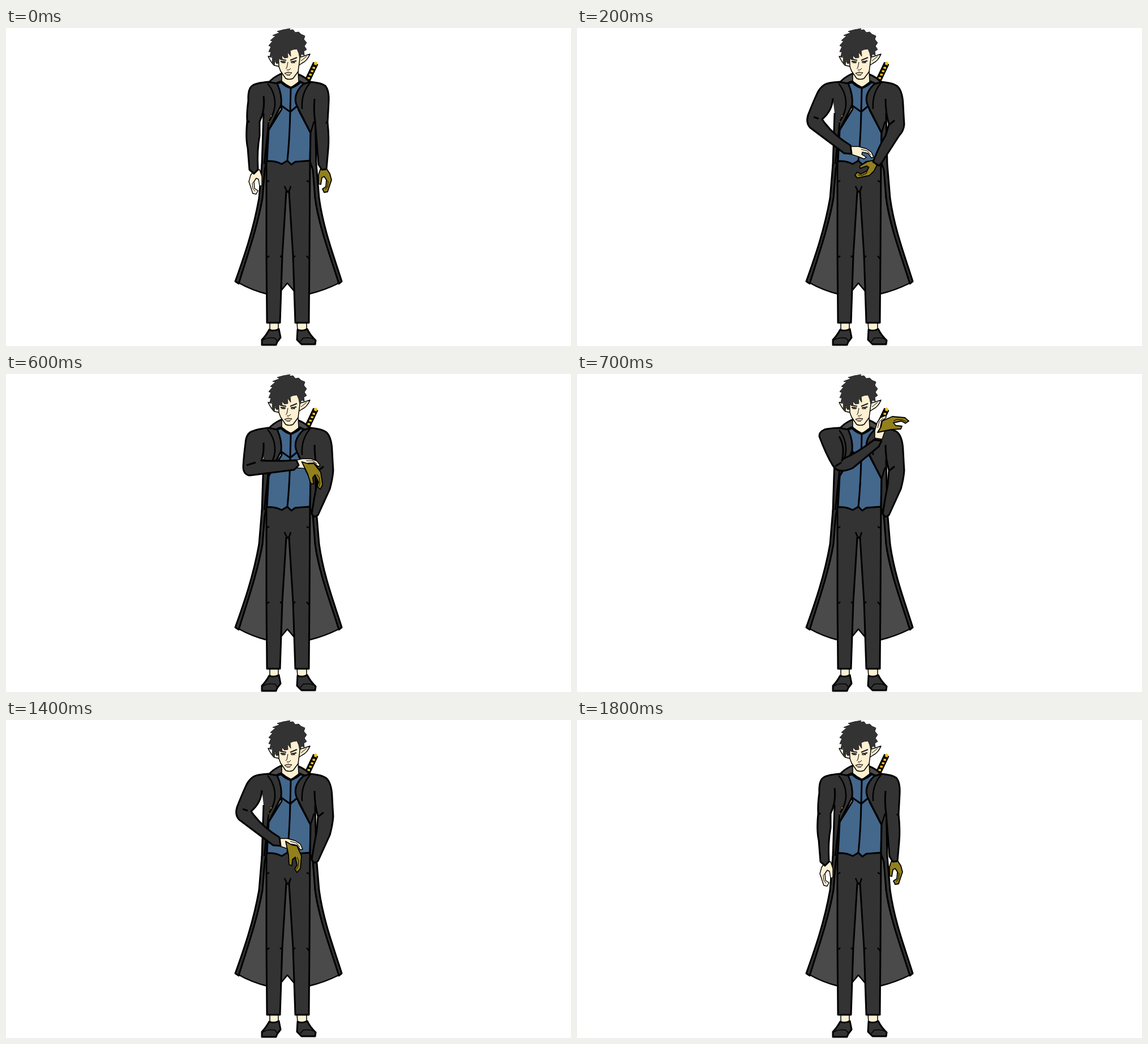
Animation, 998 px wide and 561 px high, one loop 1.9 s. Source, as an HTML page with a canvas:

```html
<!DOCTYPE html>
<html lang="en">
<head>
<meta charset="utf-8">
<title>Swordsman removing a glove</title>
<style>
html, body { margin: 0; width: 100%; height: 100%; overflow: hidden; background: #fff; }
canvas { display: block; }
</style>
</head>
<body>
<canvas id="stage" width="998" height="561"></canvas>
<script>
const ctx = document.getElementById('stage').getContext('2d');
const DARK = '#333', LINING = '#4a4a4a', BLUE = '#44678c', SKIN = '#fff0d2', GLOVE = '#92801c', GOLD = '#f2c318';

function shape(d, fill, width = 3, stroke = '#000') {
  const path = new Path2D(d);
  if (fill) { ctx.fillStyle = fill; ctx.fill(path); }
  if (width) { ctx.lineWidth = width; ctx.strokeStyle = stroke; ctx.stroke(path); }
}
const line = (d, width = 3, color) => shape(d, null, width, color);

function at([x, y, angle = 0], draw, flip = 1) {
  ctx.save();
  ctx.translate(x, y);
  ctx.rotate(angle * Math.PI / 180);
  ctx.scale(flip, 1);
  draw();
  ctx.restore();
}

// Blends two paths that share the same commands.
function mix(a, b, k = 0.5) {
  const number = /-?[\d.]+/g, ends = b.match(number);
  let i = 0;
  return a.replace(number, v => +v + (ends[i++] - v) * k);
}

const swordArm = {
  down: 'M463 95 Q442 97 436 101 Q427 106 428 128 Q425 150 426 165 Q423 195 427 212 L430 250 L438 257 L445 250 Q443 215 448 190 L448 165 Q458 145 455 120 M425 168 L430 164',
  waist: 'M463 95 Q444 96 437 100 Q428 106 423 118 Q414 138 408 154 Q404 168 412 176 L472 221 L485 222 L483 207 Q455 190 438 168 L433 161 Q451 146 452 124 M418 157 L427 160',
  chest: 'M463 95 Q444 97 435 101 Q424 105 423 122 Q420 145 419 163 Q419 177 430 179 L509 169 L517 161 L513 152 Q490 154 453 153 L451 153 Q456 140 455 121 M425 161 L441 156',
  shoulder: 'M463 95 Q444 96 437 98 Q427 103 428 110 Q440 142 451 160 Q460 178 487 166 L533 128 L538 118 L525 116 Q495 139 470 150 L468 153 Q474 128 463 110 M456 163 L467 156'
};
const gloveArm = {
  down: 'M538 95 Q558 97 564 102 Q571 110 570 130 Q569 150 568 166 Q571 195 569 215 L566 249 L558 250 L552 241 Q550 215 548 190 L546 165 Q543 145 545 125 M569 164 L565 168',
  waist: 'M538 95 Q558 97 565 102 Q575 110 576 135 Q577 155 578 170 Q577 182 569 190 L538 238 L533 243 L523 236 Q535 205 545 190 L551 170 Q545 150 545 125 M551 171 L561 163',
  bare: 'M538 95 Q558 97 565 102 Q575 110 576 135 Q577 155 578 170 Q577 185 572 203 L551 249 L545 252 L540 247 Q544 220 549 195 L551 170 Q545 150 545 125 M551 171 L561 163'
};

// relaxed: open hand; grip: reaching hand; worn: glove on; held: glove carried in the grip
const poses = [
  { left: swordArm.down, right: gloveArm.down, relaxed: [443, 251, 0], worn: [561, 248, 0] },
  { left: mix(swordArm.down, swordArm.waist), right: mix(gloveArm.down, gloveArm.waist), relaxed: [465, 233, -28], worn: [545, 243, 30] },
  { left: swordArm.waist, right: gloveArm.waist, grip: [485, 215], worn: [527, 238, 60] },
  { left: swordArm.waist, right: mix(gloveArm.waist, gloveArm.bare), grip: [485, 215], held: true },
  { left: swordArm.waist, right: gloveArm.bare, grip: [485, 215], held: true },
  { left: mix(swordArm.waist, swordArm.chest), right: gloveArm.bare, grip: [500, 187, -7], held: true },
  { left: swordArm.chest, right: gloveArm.bare, grip: [514, 158, -14], held: true },
  { left: swordArm.shoulder, right: gloveArm.bare, grip: [532, 112, -90], held: true }
];

function openHand(color, width) {
  shape('M-5 -1 L-9 11 L-9 27 L-5 28 L-3 16 L1 14 L5 20 L4 32 L-2 36 L1 42 L7 41 L14 20 L11 9 L5 0 Z', color, width);
  line('M5 20 L8 23 L7 32 L3 37', 1);
}
function grip() {
  shape('M-1 -6 L12 -6 L26 -2 L35 4 L39 13 L35 14 L29 6 L19 4 L18 8 L26 13 L22 16 L12 12 L-3 7 Z', SKIN, 1.4);
  line('M17 -1 L28 2 L34 9', 1);
}
function heldGlove() {
  shape('M9 -1 L19 5 L29 7 L37 25 L35 47 L29 54 L25 48 L29 41 L26 27 L21 31 L20 42 L15 40 L14 23 Z', GLOVE, 1.8);
  line('M29 27 L32 33 L31 43 L28 49', 1);
}

function legs() {
  shape('M452 240 L449 300 C440 360 420 410 410 449 Q435 463 460 469 L487 462 L497 450 L508 463 L536 469 Q562 463 588 450 C575 400 552 350 546 300 L543 230 Z', LINING, 2.5);
  shape('M466 519 L466 534 L481 534 L481 519 Z M514 519 L515 534 L531 534 L531 519 Z', SKIN, 1.5);
  shape('M465 532 Q473 536 482 531 L485 546 L479 554 L477 559 L452 559 L452 550 Q459 543 465 532 Z', DARK);
  shape('M515 532 Q523 536 532 531 Q538 543 547 551 L546 558 L522 558 L514 550 Z', DARK);
  line('M453 551 Q462 545 475 547 L480 553 M546 550 Q538 545 525 547 L520 553', 1.5);
  shape('M460 234 L460 400 L461 520 L484 520 L488 402 L495 289 L500 289 L507 402 L511 520 L535 520 L536 400 L537 234 Z', DARK);
  line('M492 279 L496 288 L500 288 L503 279 M460 272 L465 269 M536 272 L531 269 M461 405 L465 402 M488 405 L484 402 M507 405 L511 402 M536 408 L531 402', 2.5);
}

function sword() {
  line('M529 100 L547 62', 10);
  line('M546 65 L548 60', 5, GOLD);
  for (let i = 0; i < 5; i++) {
    const x = 543.5 - i * 3, y = 71 - i * 6;
    const yy = y + i * 12;
    line(`M${x - 2} ${yy - 1} L${x + 2.5} ${yy - 0.5}`, 3.6, GOLD);
  }
}

function torso() {
  shape('M463 97 Q472 87 485 81 L517 82 Q530 87 538 97 L520 106 L482 106 Z', LINING);
  shape('M487 76 L487 95 L502 106 L517 95 L516 76 Z', SKIN, 1.5);
  shape('M478 98 L486 96 Q494 104 503 106 Q512 103 520 96 L528 98 L517 145 L538 185 L537 234 L511 236 L504 241 L497 234 L487 240 Q475 234 461 235 L464 180 L487 143 L482 115 Z', BLUE);
  line('M478 97 L486 94 Q494 101 503 105 Q512 102 519 94 L527 98 M503 106 L502 148 Q501 195 497 234 M485 136 L502 148 L515 137');
}

function coat() {
  shape('M450 108 L463 95 L479 98 Q488 118 486 136 L463 182 L460 236 L457 250 L453 300 C444 352 425 405 411 451 L405 447 C420 405 437 357 447 300 L452 240 L455 150', DARK);
  shape('M550 108 L538 95 L525 99 Q505 118 514 138 L538 185 L537 236 L542 250 L546 300 C553 352 574 405 588 451 L593 447 C580 405 561 357 553 300 L548 240 L546 150', DARK);
  line('M462 98 Q476 114 475 137 Q473 153 464 165 L456 240 M537 97 Q521 115 523 143 M538 185 L544 165', 2.5);
  for (const [x, y, r] of [[468, 155, 1.8], [464, 165, 1.4]]) {
    ctx.beginPath();
    ctx.arc(x, y, r, 0, 7);
    ctx.fillStyle = '#c08a18';
    ctx.fill();
    ctx.lineWidth = 0.8;
    ctx.stroke();
  }
}

function head() {
  shape('M482 54 L463 50 Q468 61 474 66 L483 68 Z M518 52 L537 46 Q532 58 523 62 L517 66 Z', SKIN, 1.5);
  line('M479 63 L472 56 M521 58 L531 50', 1);
  shape('M481 34 L482 68 L485 76 L494 89 Q500 92 507 89 L516 77 L519 54 L518 30 Z', SKIN, 1.5);
  line('M484 55 L495 57 M502 57 L514 52', 2.2, '#222');
  line('M485 59 L494 60 M503 60 L513 58', 1.8);
  line('M486 61 L493 62 M504 62 L511 61', 0.8);
  shape('M488 58 L491 58 L491 62 L488 62 Z M507 58 L510 58 L510 62 L507 62 Z', '#333', 0);
  line('M498 60 L496 70 L494 72 M496 74 L500 74 L503 71 M492 80 L498 78 L505 79 M496 83 L502 83', 1);
  shape('M492 80 L498 78 L505 79 L501 83 L496 83 Z', '#d9bda0', 0.8);
  shape('M519 54 L522 46 L527 48 L526 41 L531 38 L527 32 L531 26 L526 20 L528 14 L521 11 L517 7 L511 8 L507 3 L500 4 L502 1 L490 3 L479 6 L484 8 L471 13 L476 14 L467 22 L471 23 L464 31 L468 33 L464 42 L468 42 L466 50 L471 49 L470 62 L474 67 L475 55 L478 63 L481 62 L482 54 L488 55 L487 48 L492 53 L498 52 L497 42 L503 50 L502 40 L507 38 L514 37 L517 44 Z', DARK, 1, '#222');
}

function drawFigure({ left, right, relaxed, grip: hand, worn, held }) {
  ctx.fillStyle = '#fff';
  ctx.fillRect(0, 0, 998, 561);
  ctx.lineJoin = 'round';
  ctx.lineCap = 'butt';
  legs();
  sword();
  torso();
  coat();
  head();
  if (worn) at(worn, () => openHand(GLOVE, 1.8));
  shape(right, DARK);
  if (relaxed) at(relaxed, () => openHand(SKIN, 1.4), -1);
  if (hand) at(hand, () => { grip(); if (held) heldGlove(); });
  shape(left, DARK);
}

function poseIndex(ms) {
  const step = Math.floor(ms / 100);
  return step < 12 ? Math.min(step, 7) : 18 - step;
}

function tick() {
  drawFigure(poses[poseIndex(performance.now() % 1900)]);
  requestAnimationFrame(tick);
}
tick();
</script>
</body>
</html>
```
